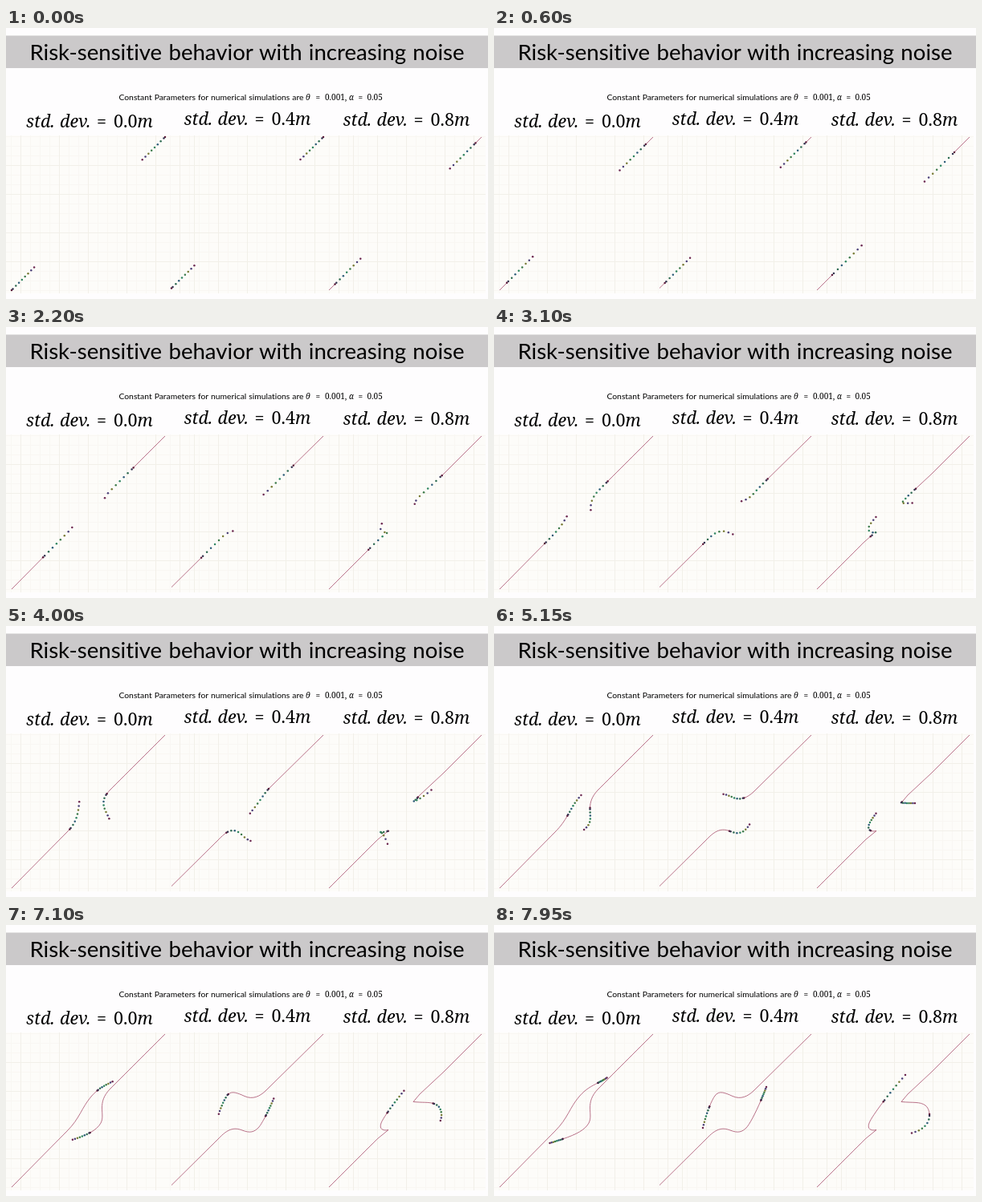
Animation, 600 px wide and 338 px high, one loop 8 s. Source, as an HTML page:

```html
<!DOCTYPE html>
<html lang="en">
<head>
<meta charset="utf-8">
<title>Risk-sensitive behavior</title>
<style>
  html, body { margin: 0; width: 100%; height: 100%; overflow: hidden; background: #fefdfe; }
  svg { display: block; width: 100%; height: 100%; }
  text { font-variant-ligatures: none; }
  .sans { font-family: Lato, "Open Sans", sans-serif; text-anchor: middle; }
  .math { font-family: "Noto Serif", "Liberation Serif", serif; }
  .math .i { font-style: italic; }
  .trail { fill: none; stroke: #a8506c; stroke-width: .8; stroke-linejoin: round; }
</style>
</head>
<body>
<svg id="stage" viewBox="0 0 600 338">
  <rect width="600" height="338" fill="#fefdfe"/>
  <rect y="9.5" width="600" height="40.5" fill="#cbc9ca"/>
  <text class="sans" x="300" y="40" font-size="27.6" word-spacing="1.2">Risk-sensitive behavior with increasing noise</text>
  <text class="sans" x="255.5" y="90.3" font-size="10.35" word-spacing=".4">Constant Parameters for numerical simulations are</text>
  <text class="math" y="90.3" font-size="10"><tspan class="i" x="373">θ</tspan><tspan x="385.5">=</tspan><tspan x="397">0.001,</tspan><tspan class="i" x="427">α</tspan><tspan x="438.5">=</tspan><tspan x="449.5">0.05</tspan></text>
  <rect y="134" width="597" height="197" fill="#fdfcf9"/>
  <g id="grid" fill="none"></g>
  <g id="labels"></g>
  <g id="agents"></g>
</svg>
<script>
const LOOP = 8000, STEP = 50, RESUME = 6250, END = 7950;
const CRUISE = .0268; // px per ms
const COLORS = ['#5c1c3c', '#34344f', '#2f6b52', '#2d5c78', '#2f8560', '#3c7a4a', '#777a34', '#4b4078', '#6c2850'];
const $ = id => document.getElementById(id);

function add(parent, tag, attrs, text) {
  const el = document.createElementNS('http://www.w3.org/2000/svg', tag);
  for (const k in attrs) el.setAttribute(k, attrs[k]);
  if (text) el.textContent = text;
  parent.appendChild(el);
  return el;
}

function drawGrid() {
  const row = y => `M0 ${y}H597`, column = x => `M${x} 134V331`;
  let minor = '', major = '';
  for (let y = 135.5; y < 331; y += 12) minor += row(y);
  for (let y = 171.5; y < 331; y += 84) major += row(y) + row(y + 36);
  for (let left = 0; left < 597; left += 198) {
    for (let x = 6.5; x < 198; x += 12) minor += column(left + x);
    for (let x = 18.5; x < 198; x += 84) major += column(left + x) + column(left + x + 48);
  }
  add($('grid'), 'path', { d: minor, stroke: '#f9f7f3' });
  add($('grid'), 'path', { d: major, stroke: '#f2f0e9' });
}

function drawLabel(x, y, value) {
  const label = add($('labels'), 'text', { class: 'math', y, 'font-size': 21.5 });
  const part = (dx, text, style = '') => add(label, 'tspan', { x: x + dx, class: style }, text);
  part(0, 'std.', 'i');
  part(42, 'dev.', 'i');
  part(88, '=');
  part(109, value);
  part(138.5, 'm', 'i');
}

// Each agent cruises along its route, slows down at `brake`, then speeds up again.
// Its planned dots reach ahead along the route; `bend` is the swerve it considers midway.
const agents = [
  { start: 120, brake: 3900, slow: .018, near: 31, last: 13, bend: [-8, -4],
    route: 'M7 327L76 257C92 241 94 228 106 214S128 199 140.5 190.5' },
  { start: 120, brake: 3900, slow: .0165, near: 30, last: 17, bend: [9, -3],
    route: 'M198 136L130 204C112 222 124 236 118 247S96 264 69.5 272' },
  { start: 250, brake: 3500, slow: .017, near: 30, last: 18, bend: [-4, 11],
    route: 'M206 324.5L264 267C276 254 284 252 294 256S309 258 314 253S330 226 339 202' },
  { start: 250, brake: 3500, slow: .017, near: 27, last: 28, bend: [6, 20],
    route: 'M395 136L324 206C316 214 307 218 297 213.5S280 206 275 213S264 236 260 253' },
  { start: -400, brake: 3250, slow: .0065, near: 26, last: 43, bend: [0, 38],
    route: 'M402 327L452 277Q462 266 476 255.5C470 257 464 255 467 247S490 212 512 187' },
  { start: -400, brake: 3650, slow: .0068, near: 18, last: 35, bend: [5, -17],
    route: 'M592 136L545 183L515 211L507 220.5C522 222 530 220 537 225S548 252 520 259.5' }
];

const ramp = (t, from, to) => Math.min(1, Math.max(0, (t - from) / (to - from)));

function travelled(agent, t) {
  const { start, brake, slow, last, total } = agent;
  const now = Math.min(t, RESUME);
  const d = CRUISE * Math.max(0, Math.min(now, brake) - start) + slow * Math.max(0, now - brake);
  return d + (total - last - d) * ramp(t, RESUME, END);
}

function reach(agent, t, d) {
  const { near, last } = agent;
  const open = Math.min(52, 40 + .45 * d);
  return open + (near - open) * ramp(t, 2200, 4600) + (last - near) * ramp(t, RESUME, END);
}

function drawAgent(agent, t) {
  const d = travelled(agent, t), ahead = reach(agent, t, d);
  const swerve = Math.exp(-(((t - 4000) / 600) ** 2));
  agent.trail.setAttribute('stroke-dasharray', `${d} 999`);
  agent.dots.forEach((dot, i) => {
    const u = Math.max(0, (i - .6) / (COLORS.length - 1.6));
    const p = agent.trail.getPointAtLength(d + ahead * u);
    dot.setAttribute('cx', p.x + agent.bend[0] * swerve * u * u);
    dot.setAttribute('cy', p.y + agent.bend[1] * swerve * u * u);
  });
}

drawGrid();
drawLabel(25, 123.5, '0.0');
drawLabel(221.5, 121, '0.4');
drawLabel(419.5, 122, '0.8');
for (const agent of agents) {
  agent.trail = add($('agents'), 'path', { class: 'trail', d: agent.route });
  agent.total = agent.trail.getTotalLength();
  agent.dots = COLORS.map(fill => add($('agents'), 'circle', { r: 1.25, fill }));
}

const begin = performance.now();
function frame() {
  const elapsed = Math.max(0, performance.now() - begin) % LOOP;
  const t = Math.floor(elapsed / STEP) * STEP;
  agents.forEach(agent => drawAgent(agent, t));
  requestAnimationFrame(frame);
}
frame();
</script>
</body>
</html>
```
